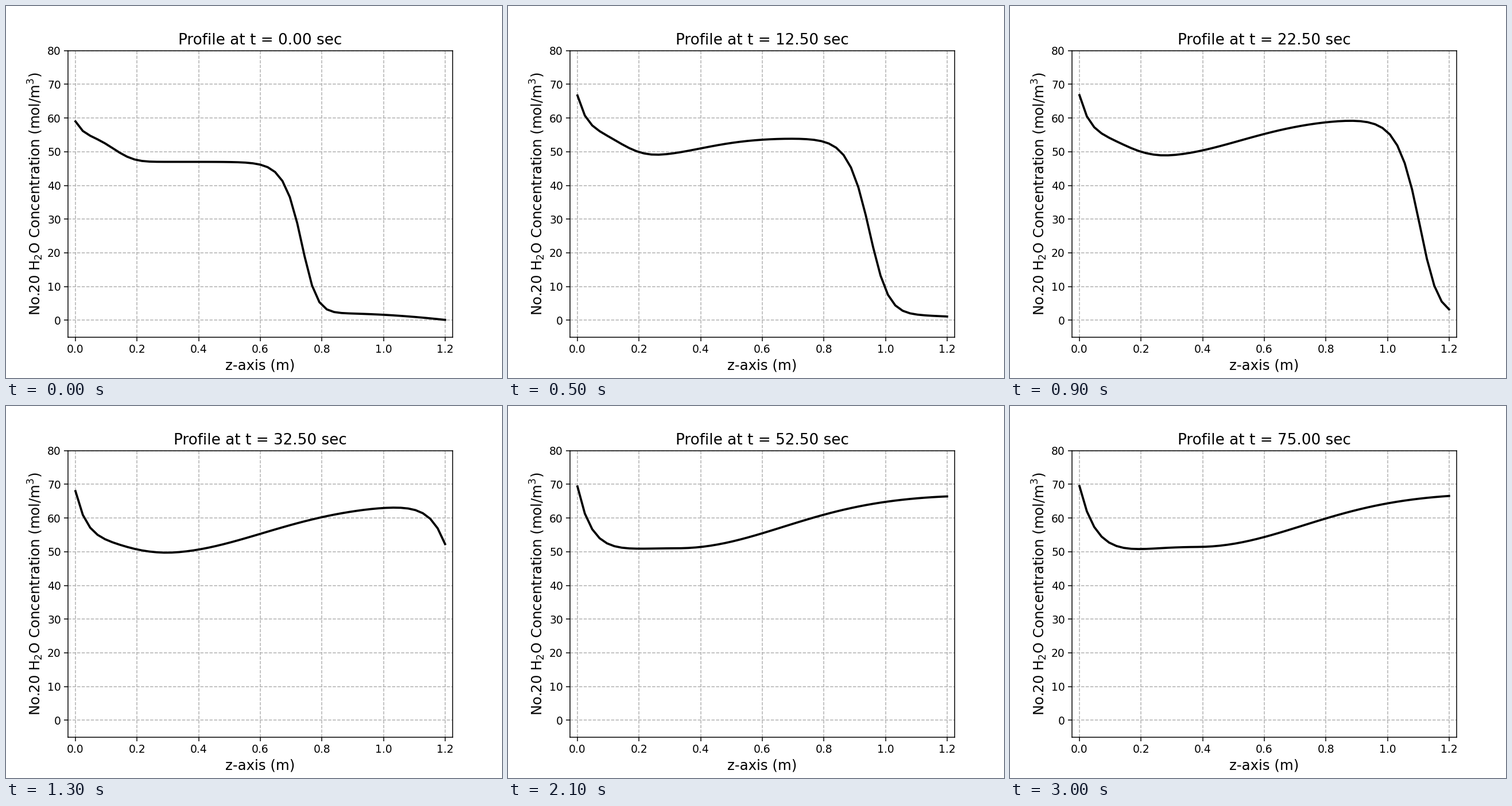
Animation, 864 px wide and 648 px high, one loop 3.1 s. Source, as a matplotlib script:

```python
import numpy as np
import matplotlib.pyplot as plt
from matplotlib.animation import FuncAnimation

FRAMES, INTERVAL = 31, 100
DT = 2.5                                  # simulated seconds per frame
KEYS = [0, 12.5, 22.5, 42.5, 60]          # key times in simulated seconds
z = np.linspace(0, 1.2, 51)


def keyed(t, *values):
    """Linear between the key times, holding the last value."""
    return np.interp(t, KEYS[:len(values)], values)


def body(t):
    """Concentration behind the front: floor, inlet hump and outlet rise."""
    floor = keyed(t, 47, 48.9, 48.75, 50.5, 51.45)
    inlet = keyed(t, 59, 66.7, 66.8, 69.2, 69.5)

    hump = 2.7 - 4.6 * np.tanh((t - 35) / 18)
    hump_width = 0.145 + 0.0013 * t
    spike = inlet - floor - hump
    spike_length = 0.028 + 0.0003 * t

    rise = 16 * (1 - np.exp(-(t / 20) ** 2))
    rise_width = 0.2 + 0.28 * (1 - np.exp(-(t / 22) ** 3))
    past = np.maximum(z - 0.19 - 0.0026 * t, 0)

    return (floor
            + hump * np.exp(-(z / hump_width) ** 3)
            + spike * np.exp(-z / spike_length)
            + rise * (1 - np.exp(-(past / rise_width) ** 2)))


def tail(t):
    """Small concentration still ahead of the front."""
    fall = np.clip((z - 0.86) / 0.34, 0, 1) ** 1.8
    return keyed(t, 2.0, 1.8, 1.4) - keyed(t, 1.9, 0.7, 0) * fall


def profile(t):
    """Asymmetric front travelling along z, between body and tail."""
    pos = 0.748 + 0.01738 * t - 0.000037 * t ** 2
    steep = keyed(t, 45, 34.6, 36.7)
    power = keyed(t, 0.6, 0.7, 0.6)
    ahead = (1 + np.exp(-steep * (z - pos))) ** -power
    return body(t) * (1 - ahead) + tail(t) * ahead


fig, ax = plt.subplots(figsize=(6.4, 4.8), dpi=135)
line, = ax.plot(z, profile(0), color="black", linewidth=2)
title = ax.set_title("", fontsize=14)
ax.set_xlabel("z-axis (m)", fontsize=13, labelpad=3.5)
ax.set_ylabel("No.20 H$_2$O Concentration (mol/m$^3$)", fontsize=13,
              labelpad=2.8)
ax.tick_params(pad=3)
ax.set_xlim(-0.0242, 1.2238)
ax.set_ylim(-5, 80)
ax.grid(linestyle="--")


def update(frame):
    t = frame * DT
    line.set_ydata(profile(t))
    title.set_text(f"Profile at t = {t:.2f} sec")
    return line, title


anim = FuncAnimation(fig, update, frames=FRAMES, interval=INTERVAL,
                     repeat=True, repeat_delay=0)
plt.show()
```
